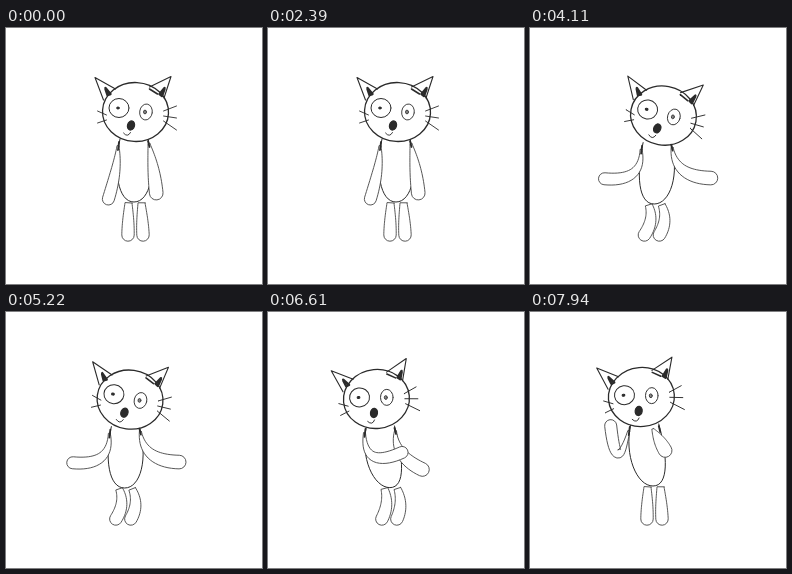
An HTML page with a canvas for the animation above (8000 ms loop, 256 by 256 pixels).

```html
<!DOCTYPE html>
<html lang="en">
<head>
<meta charset="utf-8">
<title>Dancing cat</title>
<style>
  html, body { margin: 0; width: 100%; height: 100%; overflow: hidden; background: #fff; }
  canvas { display: block; width: 100vw; height: 100vh; }
</style>
</head>
<body>
<canvas id="stage"></canvas>
<script>
const LOOP = 8000, STEPS = 144, STEP = LOOP / STEPS;
const SWAY_PERIOD = 1217, SWAY_START = 3974, TILT_LEAD = 0.5;
const UPPER_ARM = 25, LOWER_ARM = 29, INK = '#2b2b2b', SOFT_INK = '#454545';
const canvas = document.getElementById('stage');
const ctx = canvas.getContext('2d');

function ramp(t, start, end) {
  const u = Math.min(1, Math.max(0, (t - start) / (end - start)));
  return u * u * (3 - 2 * u);
}

// Moves an angle in degrees and a length away from a point.
function polar([x, y], degrees, length) {
  const a = degrees * Math.PI / 180;
  return [x + Math.cos(a) * length, y + Math.sin(a) * length];
}

function arm(shoulder, upper, lower, reach) {
  const elbow = polar(shoulder, upper, UPPER_ARM * reach);
  return [shoulder, elbow, polar(elbow, lower, LOWER_ARM * reach)];
}

// The act: stand, dance with arms out, hand to mouth, hug, wave.
function poseAt(t) {
  const dance = ramp(t, 2390, 2750) - ramp(t, 5450, 6000);
  const mouth = ramp(t, 5450, 6000) - ramp(t, 6220, 6760);
  const hug = ramp(t, 6220, 6760) - ramp(t, 7200, 7650);
  const wave = ramp(t, 7200, 7650);
  const squat = dance + hug;

  const phase = (t - SWAY_START) / SWAY_PERIOD * Math.PI * 2;
  const sway = dance * Math.sin(phase);
  const lean = -10.5 * hug - 7.5 * wave;
  const tilt = lean + 8 * dance * Math.sin(phase + TILT_LEAD);

  const base = 128 - 11 * ramp(t, 2390, 6000) + 6 * (hug + wave);
  const chestX = base + 6.5 * sway + 1.1 * lean;
  const headY = 84 + 3.6 * squat + wave;
  const chestY = headY + 29;

  return {
    tilt,
    head: [chestX + 1.5 + 0.65 * tilt, headY],
    chest: [chestX, chestY],
    hip: [base + 2 * sway, 174 + 2 * squat],
    foot: base - 6 - 2.5 * squat,
    bend: 4 * squat,
    left: arm([chestX - 16, chestY + 5],
      96 + 13 * dance - 8 * mouth - 31 * hug + 19 * wave,
      104 + 65 * dance - 154 * mouth - 102 * hug + 151 * wave, 1),
    right: arm([chestX + 15 - 7 * wave, chestY + 3],
      80 - 16 * dance - 6 * hug - 20 * wave,
      83 - 67 * dance - 11 * mouth - 53 * hug - 23 * wave,
      0.92 + 0.08 * dance - 0.46 * wave)
  };
}

function ink(width, fill, color = INK) {
  if (fill) { ctx.fillStyle = fill; ctx.fill(); }
  ctx.lineWidth = width;
  ctx.strokeStyle = color;
  ctx.stroke();
}

function line(width, ...points) {
  ctx.beginPath();
  points.forEach(p => ctx.lineTo(...p));
  ink(width);
}

function oval(x, y, rx, ry, turn, width, fill) {
  ctx.beginPath();
  ctx.ellipse(x, y, rx, ry, turn, 0, 7);
  ink(width, fill);
}

// A soft limb around a curve through three points, widening to a round end.
function limb([a, m, b], r0, r1) {
  const c = m.map((v, k) => 2 * v - (a[k] + b[k]) / 2);
  const near = [], far = [];
  let angle;
  for (let i = 0; i <= 20; i++) {
    const u = i / 20, w = 1 - u;
    const [x, y] = a.map((v, k) => w * w * v + 2 * w * u * c[k] + u * u * b[k]);
    const [dx, dy] = a.map((v, k) => w * (c[k] - v) + u * (b[k] - c[k]));
    angle = Math.atan2(dy, dx);
    const r = r0 + (r1 - r0) * Math.sin(u * Math.PI / 2);
    const nx = Math.sin(angle) * r, ny = -Math.cos(angle) * r;
    near.push([x + nx, y + ny]);
    far.unshift([x - nx, y - ny]);
  }
  ctx.beginPath();
  near.forEach(p => ctx.lineTo(...p));
  ctx.arc(b[0], b[1], r1, angle - Math.PI / 2, angle + Math.PI / 2);
  far.forEach(p => ctx.lineTo(...p));
  ctx.closePath();
  ink(0.9, '#fff', SOFT_INK);
}

function drawLegs({ hip: [x, y], foot, bend }) {
  for (const side of [0, 1]) {
    const top = [x - 5.5 + 13 * side, y + 1];
    const end = [foot + 15 * side, 207];
    const knee = [(top[0] + end[0]) / 2 + bend, (top[1] + end[1]) / 2];
    limb([top, knee, end], 3.5, 6.2);
  }
}

function drawBody({ chest: [x, y], hip: [hx, hy] }) {
  ctx.beginPath();
  ctx.moveTo(x - 14, y - 2);
  ctx.bezierCurveTo(x - 21, y + 30, hx - 16, hy, hx, hy);
  ctx.bezierCurveTo(hx + 16, hy, x + 23, y + 30, x + 14, y - 2);
  ink(1, '#fff');
}

function drawHead({ head, tilt }) {
  ctx.save();
  ctx.translate(...head);
  ctx.rotate(tilt * Math.PI / 180);
  oval(0, 0, 33, 29.5, 0.05, 1.3, '#fff');

  line(1.1, [-32, -12], [-40.5, -34.5], [-20, -23]);
  line(1.1, [14, -25], [35.5, -35.5], [28.5, -14]);
  line(2.4, [-30, -23], [-28, -17], [-25, -18], [-30, -24]);
  line(2.4, [29, -24], [24, -18], [26.5, -16], [29, -23]);
  line(1.6, [14, -23], [22, -18]);

  oval(-16.5, -4, 10, 9.5, 0, 1);
  oval(-17.5, -4, 1.4, 1, 0, 1, INK);
  oval(10.5, 0, 6.3, 8, 0.15, 0.9);
  oval(9.5, 0, 1.5, 1.9, 0, 0.8, '#888');
  oval(-4.5, 13.5, 3.5, 4.6, 0.3, 1.2, INK);
  ctx.beginPath();
  ctx.moveTo(-12, 21);
  ctx.quadraticCurveTo(-8, 26, -5, 20.5);
  ink(0.9);

  for (let i = 0; i < 3; i++) line(0.9, [28, -1 + 5 * i], [41, -6 + 12 * i]);
  for (let i = 0; i < 2; i++) line(0.9, [-38, -1 + 12 * i], [-29, 3 + 5 * i]);
  ctx.restore();
}

function drawCat(pose) {
  drawLegs(pose);
  drawBody(pose);
  drawHead(pose);
  limb(pose.right, 1, 6.8);
  limb(pose.left, 1, 6);
  const [x, y] = pose.chest;
  line(1.8, [x - 15, y + 1], [x - 16, y + 9]);
  line(1.8, [x + 14, y], [x + 15.5, y + 6]);
}

function draw(now) {
  const t = Math.floor((now % LOOP + 4) / STEP) % STEPS * STEP;
  const ratio = devicePixelRatio || 1;
  const w = Math.round(innerWidth * ratio), h = Math.round(innerHeight * ratio);
  if (canvas.width !== w || canvas.height !== h) { canvas.width = w; canvas.height = h; }
  ctx.setTransform(w / 256, 0, 0, h / 256, 0, 0);
  ctx.fillStyle = '#fff';
  ctx.fillRect(0, 0, 256, 256);
  ctx.lineCap = ctx.lineJoin = 'round';
  drawCat(poseAt(t));
  requestAnimationFrame(draw);
}
requestAnimationFrame(draw);
</script>
</body>
</html>
```
